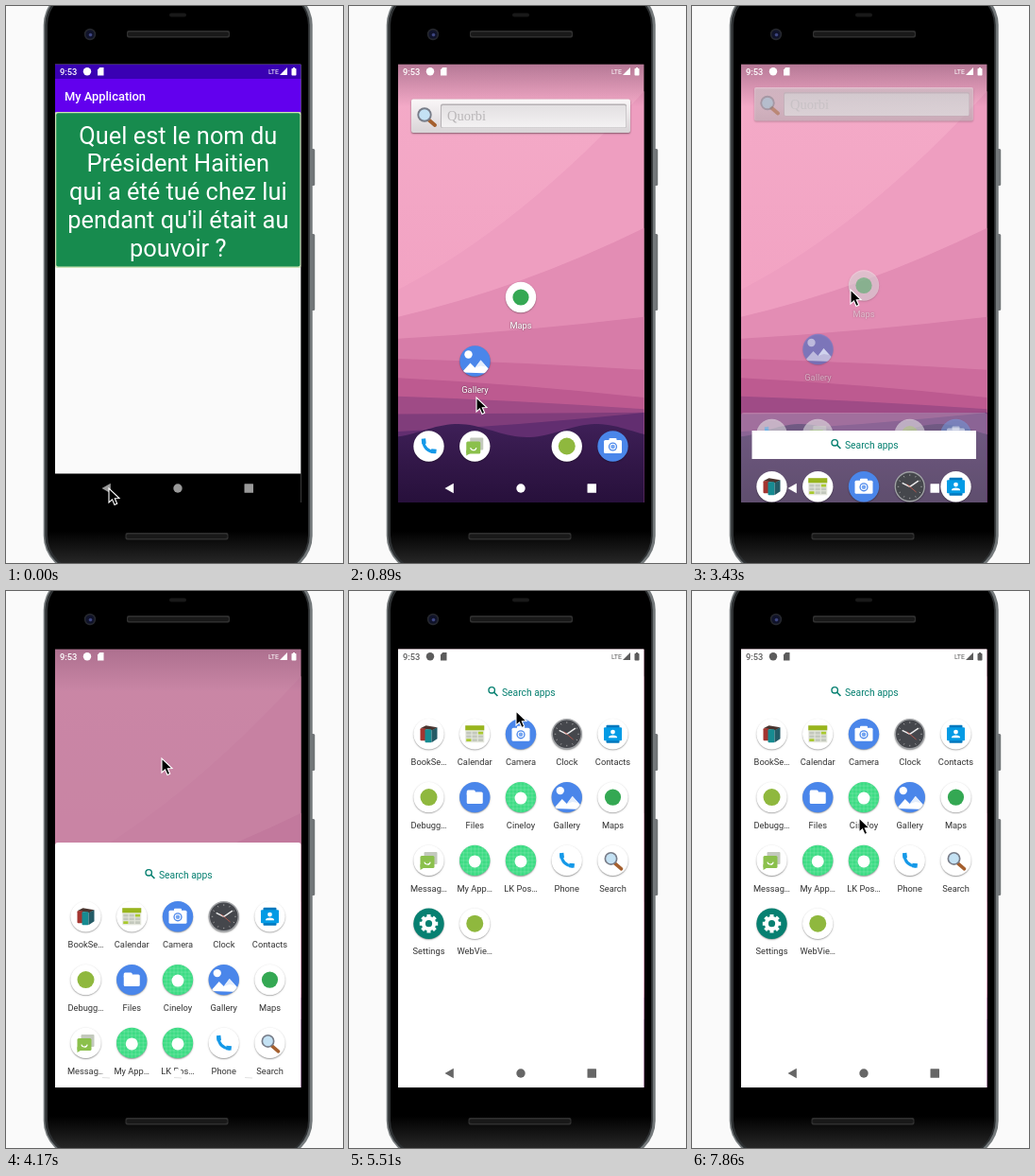
Animation, 357 px wide and 589 px high, one loop 8000 ms. Source, as an HTML page with a canvas:

```html
<!DOCTYPE html>
<html lang="en">
<head>
<meta charset="utf-8">
<title>Phone launcher</title>
<style>
html, body { margin: 0; width: 100%; height: 100%; overflow: hidden; background: #fafafa; }
canvas { display: block; width: 357px; height: 589px; }
</style>
</head>
<body>
<canvas id="stage"></canvas>
<script>
const W = 357, H = 589, LOOP = 8000, TICK = 148.4;
const L = 52, T = 61.5, R = 312.6, B = 525, MID = 182;
const CLOSED = 560, OPEN = 107; // height of the drawer's search row
const TEAL = '#078071', BLUE = '#4a86ea';
const canvas = document.getElementById('stage');
const dpr = window.devicePixelRatio || 1;
canvas.width = W * dpr;
canvas.height = H * dpr;
const c = canvas.getContext('2d');

// Gestures: from tick, to tick, pointer x, pointer y, search row y
const REST = [109, 510, CLOSED];
const MOVES = [
  [2, 6, 135, 414, CLOSED], [6, 9, 180, 378, CLOSED], [9, 14, 108, 510, CLOSED],
  [15, 18, 172, 451, CLOSED], [21, 23, 168, 300, 464], [23, 28, 165, 177, 300],
  [28, 31, 183, 82, 166], [31, 33, 183, 86, OPEN], [33, 37, 177, 127, OPEN],
  [37, 44, 203, 288, OPEN], [45, 49, 144, 266, OPEN], [49, 53, 177, 240, OPEN]
];

const clamp = v => Math.max(0, Math.min(1, v));
const mix = (a, b, u) => a + (b - a) * u;

function pose(tick) {
  let p = REST;
  for (const [from, to, ...goal] of MOVES) {
    const u = clamp((tick - from) / (to - from));
    p = p.map((v, i) => mix(v, goal[i], u));
  }
  return p;
}

function rect(x, y, w, h, fill, r = 0) {
  c.fillStyle = fill;
  c.beginPath();
  c.roundRect(x, y, w, h, r);
  c.fill();
}

function disc(x, y, r, fill) {
  c.fillStyle = fill;
  c.beginPath();
  c.arc(x, y, r, 0, 7);
  c.fill();
}

function trace(points) {
  c.beginPath();
  points.forEach(p => c.lineTo(p[0], p[1]));
}

function poly(points, fill) {
  trace(points);
  c.closePath();
  c.fillStyle = fill;
  c.fill();
}

function line(points, color, width, cap = 'butt') {
  trace(points);
  c.strokeStyle = color;
  c.lineWidth = width;
  c.lineCap = cap;
  c.stroke();
}

function ray(angle, r0, r1, color, width) {
  const x = Math.cos(angle), y = Math.sin(angle);
  line([[x * r0, y * r0], [x * r1, y * r1]], color, width);
}

function text(str, x, y, size, fill, align = 'left', weight = 400, family = 'Roboto, sans-serif') {
  c.font = `${weight} ${size}px ${family}`;
  c.textAlign = align;
  c.fillStyle = fill;
  c.fillText(str, x, y);
}

function fade(y0, y1, ...stops) {
  const g = c.createLinearGradient(0, y0, 0, y1);
  stops.forEach((s, i) => g.addColorStop(i / (stops.length - 1), s));
  return g;
}

// Runs paint at x,y with a shadow
function shaded(x, y, color, blur, drop, paint) {
  c.save();
  c.translate(x, y);
  c.shadowColor = color;
  c.shadowBlur = blur * dpr;
  c.shadowOffsetY = drop * dpr;
  paint();
  c.restore();
}

function lens(s) {
  line([[2, 3], [9, 9]], '#a5602f', 3.6 * s, 'round');
  disc(-2, -2, 7 * s, '#777c88');
  disc(-2, -2, 5.3 * s, '#c4e2f4');
}

// App glyphs, drawn around 0,0 on a round plate
const GLYPHS = {
  books: ['#fff', () => {
    poly([[-9, -6], [-3, -9], [9, -7], [4, -4]], '#4a342e');
    rect(-9, -6, 6, 13, '#a3342f', 1);
    rect(-4, -5, 7, 14, '#168b91', 1);
    poly([[3, -4], [9, -7], [9, 5], [3, 9]], '#245b66');
  }],
  calendar: ['#fff', () => {
    rect(-10, -9, 20, 18, '#e4e6dc');
    rect(-10, -9, 20, 5, '#98b51d');
    for (let i = 0; i < 9; i++)
      rect(-9 + i % 3 * 6.3, -2.5 + Math.floor(i / 3) * 3.7, 5.2, 2.7, i % 4 == 2 ? '#a9c92f' : '#c3c8bd');
  }],
  camera: [BLUE, () => {
    rect(-4, -8.5, 8, 4, '#fff', 1);
    rect(-9.5, -6.5, 19, 14, '#fff', 1.5);
    disc(0, .5, 4.6, BLUE);
    disc(0, .5, 3.3, '#fff');
    disc(0, .5, 2.3, '#75a5f2');
  }],
  clock: ['#a0a2a5', () => {
    disc(0, 0, 14.8, '#45474c');
    for (let i = 0; i < 12; i++) ray(i * Math.PI / 6, 11.5, 13, '#b5b5b5', .8);
    ray(3.6, 0, 9, '#eee', 1.4);
    ray(-.6, 0, 11, '#eee', 1.4);
    ray(.7, -4, 9, '#d95d4f', .7);
  }],
  contacts: ['#fff', () => {
    rect(-7, -9.5, 14, 19, '#0277bd', 1);
    rect(-9.5, -7, 19, 14, '#039be5', 1);
    disc(0, -2.2, 2.4, '#fff');
    c.beginPath();
    c.ellipse(0, 4, 4.6, 2.7, 0, Math.PI, 0);
    c.fill();
  }],
  robot: ['#fff', () => disc(0, 0, 9, '#8fb83e')],
  files: [BLUE, () => {
    rect(-8.5, -7.5, 9, 6, '#fff', 1.5);
    rect(-8.5, -5.5, 17, 12.5, '#fff', 1.5);
  }],
  sample: ['#3ddc84', () => {
    for (let i = -12; i <= 12; i += 4) {
      const e = Math.sqrt(256 - i * i);
      line([[i, -e], [i, e]], 'rgba(255,255,255,.25)', .6);
      line([[-e, i], [e, i]], 'rgba(255,255,255,.25)', .6);
    }
    disc(0, 1, 6.5, '#fff');
  }],
  gallery: [BLUE, () => {
    c.beginPath();
    c.arc(0, 0, 16.2, 0, 7);
    c.clip();
    disc(-7, -7, 4.2, '#fff');
    poly([[-14, 12], [-5, 2], [0, 7], [6, -1], [17, 11], [17, 13]], '#fff');
    poly([[0, 7], [6, -1], [12, 6], [6, 5]], '#e3edfc');
  }],
  maps: ['#fff', () => disc(0, 0, 8.6, '#34a853')],
  messages: ['#fff', () => {
    rect(-5, -9, 14, 13, '#c3c9bd', 1);
    rect(-9, -5, 15, 13, '#8bc04c', 1.5);
    poly([[-9, 4], [-9, 10], [-4, 7]], '#8bc04c');
    c.beginPath();
    c.arc(-1.5, 1, 3.2, .2, Math.PI - .2);
    c.strokeStyle = '#fff';
    c.lineWidth = 1.2;
    c.stroke();
  }],
  phone: ['#fff', () => {
    const blue = '#1599e8';
    c.beginPath();
    c.moveTo(-6, -6);
    c.quadraticCurveTo(-5, 5, 6.3, 6.3);
    c.strokeStyle = blue;
    c.lineWidth = 3;
    c.stroke();
    line([[-5.6, -8], [-5, -2.5]], blue, 4.5);
    line([[2.5, 5], [8, 5.6]], blue, 4.5);
  }],
  search: ['#fff', () => lens(1)],
  settings: [TEAL, () => {
    for (let i = 0; i < 8; i++) ray(i * Math.PI / 4, 0, 9.7, '#fff', 4);
    disc(0, 0, 7.6, '#fff');
    disc(0, 0, 3.6, TEAL);
  }]
};

const APPS = [['books', 'BookSe…'], ['calendar', 'Calendar'], ['camera', 'Camera'], ['clock', 'Clock'],
  ['contacts', 'Contacts'], ['robot', 'Debugg…'], ['files', 'Files'], ['sample', 'Cineloy'],
  ['gallery', 'Gallery'], ['maps', 'Maps'], ['messages', 'Messag…'], ['sample', 'My App…'],
  ['sample', 'LK Pos…'], ['phone', 'Phone'], ['search', 'Search'], ['settings', 'Settings'], ['robot', 'WebVie…']];

const colX = i => 84.5 + i * 48.75;

function icon(name, x, y) {
  const [plate, glyph] = GLYPHS[name];
  shaded(x, y, 'rgba(0,0,0,.4)', 1.5, .8, () => disc(0, 0, 16.2, plate));
  c.save();
  c.translate(x, y);
  glyph();
  c.restore();
}

function body() {
  rect(0, 0, W, H, '#fafafa');
  for (const [y, h] of [[151, 39], [241, 81]]) rect(322, y, 5.2, h, '#717577', 1.5);
  rect(39.7, -18, 285, 618, '#73787a', [38, 38, 40, 40]);
  rect(41.3, -16, 280.5, 614, '#2d3032', [36, 36, 38, 38]);
  rect(44, -14, 276, 610, fade(555, 592, '#000', '#2a2a2a'), [34, 34, 36, 36]);
  rect(173, 7.5, 18, 4, '#191919', 2);
  for (const [x, y] of [[128, 26], [126.5, 557]]) {
    rect(x, y, 109, 7.5, '#303030', 2);
    rect(x + 1, y + 1.5, 107, 4.5, '#191919', 2);
  }
  disc(89, 30, 6.2, '#25272d');
  disc(89, 30, 4.6, '#10132a');
  disc(89.5, 30.5, 1.8, '#3d457f');
}

function status(color) {
  text('9:53', 57, 73, 9.3, color, 'left', 500);
  disc(86, 69.3, 4.2, color);
  poly([[97, 67.5], [99.2, 65], [103.5, 65], [103.5, 73.5], [97, 73.5]], color);
  text('LTE', 278, 72.3, 7, color);
  poly([[298, 65], [298, 73], [290, 73]], color);
  rect(302.5, 66, 5, 7.5, color, .8);
  rect(304, 65, 2, 2, color);
}

function nav(color) {
  poly([[101.5, 510], [110.8, 504.8], [110.8, 515.2]], color);
  disc(MID, 510, 4.7, color);
  rect(252.5, 505.2, 9.5, 9.5, color, .5);
}

function app() {
  rect(L, T, R - L, B - T, '#fafafa');
  rect(L, T, R - L, 15.5, '#3a00b3');
  rect(L, 77, R - L, 35.5, '#6200ee');
  text('My Application', 62, 99.5, 12.9, '#fff', 'left', 500);
  rect(L, 112, R - L, 165, '#cfe3b8', 2.5);
  rect(L + 1.2, 113.2, R - L - 2.4, 162.4, '#178b4e', 2);
  ['Quel est le nom du', 'Président Haitien', 'qui a été tué chez lui', "pendant qu'il était au", 'pouvoir ?']
    .forEach((s, i) => text(s, 182.3, 145.5 + i * 29.8, 25.4, '#fff', 'center'));
  rect(L, 494.5, R - L, B - 494.5, '#000');
  status('#fff');
  nav('#999');
}

// Dunes from pale pink to violet, steeper towards the top
function dunes() {
  const pale = [238, 158, 192], rose = [194, 92, 146], violet = [98, 46, 112];
  for (let i = 0; i < 8; i++) {
    const u = i / 7, near = u > .55;
    const rgb = rose.map((v, k) => near ? mix(v, violet[k], (u - .55) / .45) : mix(pale[k], v, u / .55));
    const left = 300 + 150 * u ** .85, right = 430 - 340 * (1 - u) ** 3.6;
    c.fillStyle = `rgb(${rgb})`;
    c.beginPath();
    c.moveTo(L, left);
    c.quadraticCurveTo(MID, mix(right, left, .68), R, right);
    c.lineTo(R, B);
    c.lineTo(L, B);
    c.fill();
  }
}

function wallpaper() {
  rect(L, T, R - L, B - T, fade(T, 300, '#f4abc8', '#f2a3c3'));
  dunes();
  const ridge = [[L, B]];
  for (let x = L; x < R + 4; x += 4) ridge.push([x, 449 - 7 * Math.cos((x - 115) / 23.4)]);
  poly([...ridge, [R + 4, B]], fade(441, B, '#3f2058', '#321748', '#27103b'));
  rect(L, T, R - L, 45, fade(T, T + 45, 'rgba(70,30,60,.36)', 'rgba(70,30,60,0)'));
}

function homeApp(name, label, x, y) {
  icon(name, x, y);
  shaded(x, y + 33, 'rgba(0,0,0,.6)', 2, 0, () => text(label, 0, 0, 9.3, '#fff', 'center'));
}

function homeItems() {
  shaded(66, 98.5, 'rgba(0,0,0,.45)', 2, 1, () => rect(0, 0, 232, 35.5, fade(0, 36, '#faf7f8', '#d8d3d6'), 2));
  rect(97, 103.5, 197, 25.5, '#b5b1b4', 2);
  rect(98, 105, 195.4, 23.4, fade(104, 129, '#e2dfe1', '#f4f2f3'), 1.5);
  shaded(82, 117, 'transparent', 0, 0, () => lens(1.1));
  text('Quorbi', 104, 121, 14.5, '#b9b6b8', 'left', 400, 'Liberation Serif, serif');
  homeApp('maps', 'Maps', MID, 308);
  homeApp('gallery', 'Gallery', 133.5, 375.5);
  ['phone', 'messages', '', 'robot', 'camera'].forEach((n, i) => n && icon(n, colX(i), 465.5));
}

function searchRow(y) {
  rect(63.5, y - 15, 237.5, 30, '#fff');
  c.beginPath();
  c.arc(151.2, y - 2.2, 3.2, 0, 7);
  c.strokeStyle = TEAL;
  c.lineWidth = 1.4;
  c.stroke();
  line([[153.4, y], [157.4, y + 4]], TEAL, 1.7);
  text('Search apps', 162, y + 3.7, 10.3, TEAL);
}

function drawer(s) {
  const full = s <= OPEN, solid = clamp((500 - s) / 140);
  const top = full ? T - 1 : s - 34 - Math.max(0, (300 - s) * .04);
  rect(L, T, R - L, B - T, `rgba(168,107,138,${clamp((464 - s) / 298)})`);
  rect(L, top, R - L, B - top + 6, `rgba(255,255,255,${solid})`, full ? 0 : 3);
  if (solid < 1) nav('#fff');
  searchRow(s);
  APPS.forEach(([name, label], i) => {
    const x = colX(i % 5), y = s + 44.3 + Math.floor(i / 5) * 66.8;
    icon(name, x, y);
    text(label, x, y + 32.6, 9.3, '#333', 'center');
  });
  if (solid == 1) nav(full ? '#666' : '#fff');
  if (solid == 1 && !full) for (const x of [102, 178, 253]) line([[x, 514.5], [x + 8, 515]], '#d4d4d4', .7);
  status(full ? '#5c5c5c' : '#fff');
}

function home(s) {
  wallpaper();
  c.save();
  c.globalAlpha = clamp((s - 400) / 130);
  c.translate(0, (s - CLOSED) * .13);
  homeItems();
  c.restore();
  if (s < CLOSED) return drawer(s);
  status('#fff');
  nav('#fff');
}

function pointer(x, y) {
  c.save();
  c.translate(x, y);
  trace([[0, 0], [0, 15], [3.5, 11.8], [6, 17.4], [8.7, 16.2], [6.3, 10.8], [11, 10.6]]);
  c.closePath();
  c.fillStyle = '#000';
  c.fill();
  c.strokeStyle = '#fff';
  c.lineWidth = 1.1;
  c.stroke();
  c.restore();
}

function draw(ms) {
  const tick = Math.floor((ms + 10) / TICK);
  const [x, y, s] = pose(tick);
  const shown = clamp((4 - tick) / 2);
  c.setTransform(dpr, 0, 0, dpr, 0, 0);
  body();
  c.save();
  c.beginPath();
  c.rect(L, T, R - L, B - T);
  c.clip();
  if (shown < 1) home(s);
  if (shown > 0) {
    c.globalAlpha = shown;
    c.translate(0, 24 * (1 - shown));
    app();
  }
  c.restore();
  pointer(x, y);
}

const start = performance.now();
function frame() {
  draw((performance.now() - start) % LOOP);
  requestAnimationFrame(frame);
}
frame();
</script>
</body>
</html>
```
